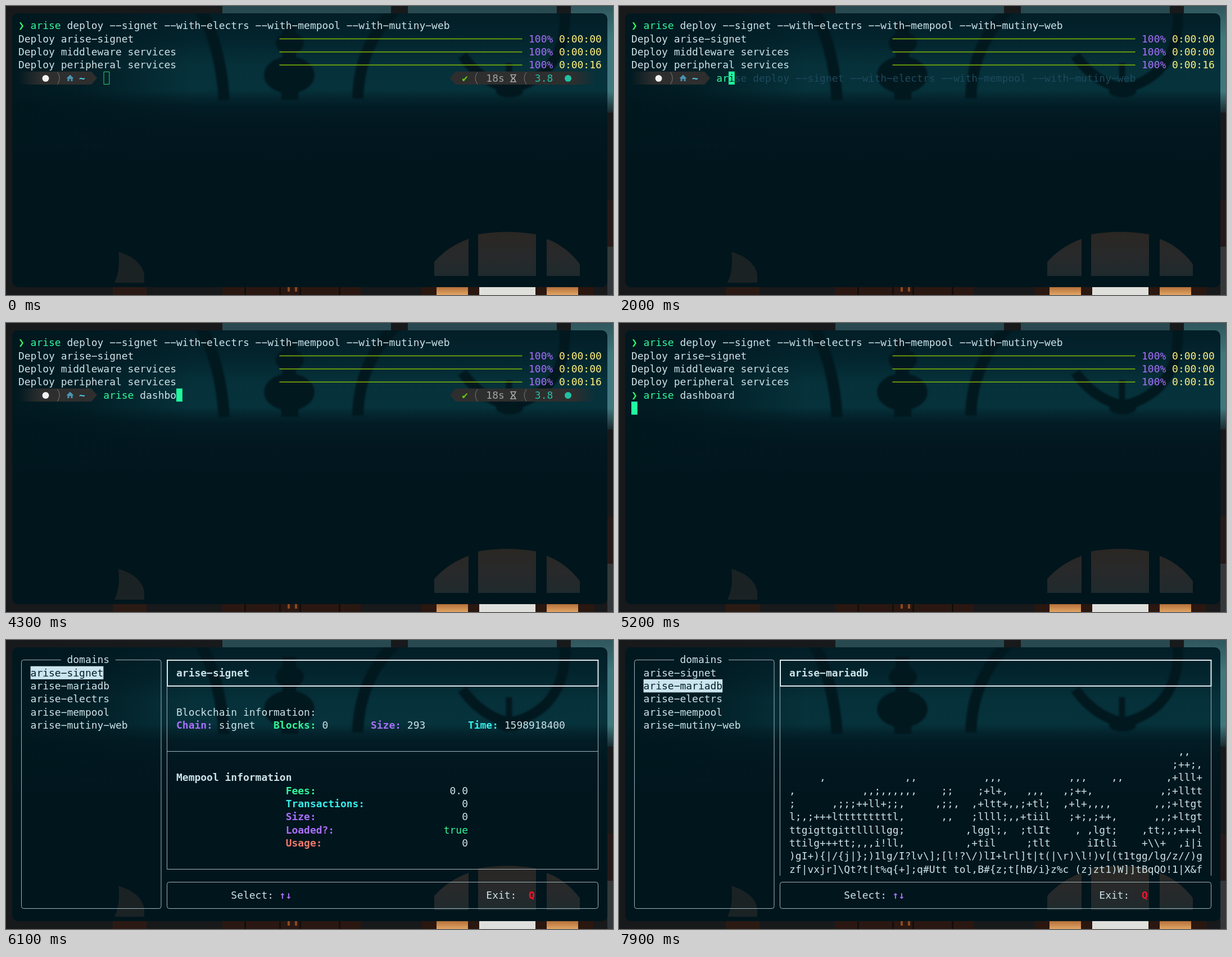
Animation of 1080 by 515 pixels, one loop 8 s. Source, as an HTML page with a canvas:

```html
<!DOCTYPE html>
<html lang="en">
<head>
<meta charset="utf-8">
<title>Terminal deploy and dashboard</title>
<style>
  html, body { margin: 0; width: 100%; height: 100%; overflow: hidden; background: #18191b; }
  canvas { display: block; }
</style>
</head>
<body>
<canvas id="stage" width="1080" height="515"></canvas>
<script>
const LOOP = 8000, FOCUS = 1000, ENTER = 5000, DASHBOARD = 5700, SELECT_DB = 6600;
const CELL = 10.81, LINE = 23.33, LEFT = 22, TOP = 23.4;
const TEXT = '#cbe3e9', GREEN = '#32f99a', PURPLE = '#a970ff', YELLOW = '#fff27c', CYAN = '#35f0ea',
  CORAL = '#f0786c', RED = '#f5122c', HINT = '#1d4a5d', FRAME = '#9db7be', INK = '#01202a';
const COMMAND = 'arise deploy --signet --with-electrs --with-mempool --with-mutiny-web';
const DOMAINS = ['signet', 'mariadb', 'electrs', 'mempool', 'mutiny-web'].map(n => 'arise-' + n);

const stage = document.getElementById('stage');
let ctx = stage.getContext('2d');

const colX = col => LEFT + col * CELL;
const rowY = row => TOP + row * LINE;

function put(text, col, row, color = TEXT, bold = false) {
  ctx.font = `${bold ? 'bold ' : ''}17.95px "DejaVu Sans Mono", monospace`;
  ctx.fillStyle = color;
  [...text].forEach((ch, i) => {
    if (ch !== ' ') ctx.fillText(ch === '-' ? '−' : ch, colX(col + i), rowY(row) + 17.9);
  });
}

function rect(x, y, w, h, color) {
  ctx.fillStyle = color;
  ctx.fillRect(x, y, w, h);
}

function dot(x, y, rx, color, ry = rx) {
  ctx.fillStyle = color;
  ctx.beginPath();
  ctx.ellipse(x, y, rx, ry, 0, 0, 7);
  ctx.fill();
}

function fillPath(d, color) {
  ctx.fillStyle = color;
  ctx.fill(new Path2D(d));
}

function strokePath(d, color, width = 1) {
  ctx.strokeStyle = color;
  ctx.lineWidth = width;
  ctx.stroke(new Path2D(d));
}

function gradient(x0, y0, x1, y1, ...stops) {
  const g = ctx.createLinearGradient(x0, y0, x1, y1);
  stops.forEach(([at, color]) => g.addColorStop(at, color));
  return g;
}

function box(x, y, w, h, radius, color, width) {
  ctx.strokeStyle = color;
  ctx.lineWidth = width;
  ctx.beginPath();
  ctx.roundRect(x, y, w, h, radius);
  ctx.stroke();
}

// Wallpaper and the translucent terminal window, painted once.
function paintBackdrop() {
  const layer = document.createElement('canvas');
  layer.width = 1080;
  layer.height = 515;
  const screen = ctx;
  ctx = layer.getContext('2d');

  rect(0, 0, 1080, 515, '#18191b');
  rect(385, 0, 300, 13, '#28494f');
  rect(715, 0, 265, 13, '#28494f');
  rect(1005, 0, 75, 190, gradient(0, 0, 0, 190, [0, '#2f565c'], [0.3, '#3f777d'], [0.8, '#3f777d'], [1, '#1a2a2e']));
  rect(1070, 345, 10, 85, '#251a19');
  rect(1070, 429, 10, 86, '#34383a');
  rect(190, 501, 60, 14, '#2b1a14');
  rect(385, 501, 246, 14, '#2a1711');
  [424, 486, 522, 592].forEach(x => rect(x, 501, 3, 14, '#120e0e'));
  [501, 514].forEach(x => rect(x, 501, 4, 8, '#8a4a22'));
  rect(740, 501, 305, 14, '#2a1710');
  const lamp = gradient(0, 501, 0, 515, [0, '#b4703a'], [1, '#e2a564']);
  rect(766, 501, 56, 14, lamp);
  rect(842, 501, 100, 14, '#dfe0dc');
  rect(962, 501, 56, 14, lamp);

  ctx.save();
  ctx.beginPath();
  ctx.roundRect(11, 13, 1059, 488, 10);
  ctx.clip();
  rect(11, 13, 1059, 488, gradient(0, 13, 0, 501,
    [0, '#031e27'], [0.1, '#03252e'], [0.19, '#06313a'], [0.28, '#06323b'], [0.31, '#04252e'],
    [0.34, '#021c25'], [0.42, '#02171f'], [0.55, '#01151d'], [1, '#01151c']));
  rect(11, 13, 320, 240, gradient(11, 0, 331, 0, [0, '#01171eee'], [0.4, '#01171ebb'], [1, '#01171e00']));

  // Soft silhouettes behind the glass.
  const shade = '#02181f';
  ctx.filter = 'blur(1.5px)';
  strokePath('M346 5 Q383 75 388 168', shade, 20);
  strokePath('M694 5 Q628 70 626 165', shade, 20);
  strokePath('M994 5 Q999 75 960 115 Q930 142 895 147 Q845 135 812 88', shade, 18);
  strokePath('M895 102 V150', shade, 11);
  dot(896, 152, 24, shade, 11);
  dot(505, 66, 25, shade, 19);
  rect(492, 30, 24, 70, shade);
  dot(504, 123, 45, shade, 33);
  rect(490, 140, 30, 27, shade);
  ctx.filter = 'none';

  const glow = gradient(0, 402, 0, 482, [0, '#2a2723'], [0.5, '#28292a'], [1, '#1f2a2d']);
  fillPath('M762 481 V456 Q787 428 823 415 V481Z M840 481 V407 Q892 398 943 407 V481Z'
    + 'M962 481 V415 Q997 428 1021 460 V481Z', glow);
  fillPath('M200 438 Q240 450 246 478 V493 H193 Q204 470 200 438Z', '#1a2224');
  ctx.restore();

  ctx = screen;
  return layer;
}

// Fire: each cell averages itself, its right neighbour and the two below.
const GLYPHS = ' ,;+ltgti!lI?/\\|)(1}{][rcvzjftJUOQocxfXhqwWB8&%$#@';
function burn(steps) {
  const width = 68, rows = 9, size = width * rows;
  const heat = new Array(size + width + 1).fill(0);
  let seed = 77;
  const random = () => (seed = (seed * 16807) % 2147483647) / 2147483647;
  const line = value => Array.from({ length: width }, (_, x) => GLYPHS[Math.floor(value(x))]).join('');
  return Array.from({ length: steps }, () => {
    for (let i = 0; i < 6; i++) heat[size - width + Math.floor(random() * width)] = 30;
    for (let i = 0; i < size; i++)
      heat[i] = Math.floor((heat[i] + heat[i + 1] + heat[i + width] + heat[i + width + 1]) / 4);
    const lines = [];
    for (let r = 0; r < rows - 1; r++) lines.push(line(x => heat[r * width + x]));
    lines.push(line(() => (random() + random()) * 14), line(() => random() * 50));
    return lines;
  });
}

// Typed text over time: a false start, one backspace, then the command.
function typedAt(t) {
  if (t < 1700) return '';
  if (t < 3480) return 'arise de'.slice(0, Math.floor((t - 1700) / 220) + 1);
  return 'arise d' + 'ashboard'.slice(0, Math.max(0, Math.floor((t - 3640) / 150) + 1));
}

function leftPrompt() {
  const y = rowY(4);
  fillPath(`M22 ${y} H152 L162 ${y + 11.7} L152 ${y + 23.3} H22Z`,
    gradient(22, 0, 62, 0, [0, '#2e2e2e00'], [1, '#2e2e2e']));
  dot(70.5, 129, 6, '#f2f2f2');
  strokePath('M91.5 118 Q99 128.5 91.5 139.5', '#77797a');
  fillPath('M107.5 129 L114 122.5 L120.5 129 H118.5 V134 H115.5 V130 H112.5 V134 H109.5 V129Z', '#4b95b3');
  put('~', 10, 4, '#55cdea', true);
}

function rightPrompt() {
  const y = rowY(4);
  fillPath(`M1050 ${y} H800 L790 ${y + 11.7} L800 ${y + 23.3} H1050Z`,
    gradient(1010, 0, 1050, 0, [0, '#2e2e2e'], [1, '#2e2e2e00']));
  put('✔', 73, 4, '#62cc0c');
  strokePath('M839 118 Q831 128.5 839 139.5 M926 118 Q918 128.5 926 139.5', '#77797a');
  put('18s', 77, 4, '#9ea3a3');
  strokePath('M897 122.5 H908 M897 135 H908 M899 123 Q899 127 902.5 129 Q906 127 906 123'
    + 'M899 135 Q899 131 902.5 129 Q906 131 906 135', '#a6aaaa', 1.6);
  put('3.8', 85, 4, '#22bfa2');
  dot(1000, 129, 6, '#22bfa2');
}

function drawShell(t) {
  put('❯', 0, 0, '#35f565', true);
  put('arise', 2, 0, GREEN);
  put(COMMAND.slice(5), 7, 0);
  [['arise-signet', '00'], ['middleware services', '00'], ['peripheral services', '16']].forEach(([name, sec], i) => {
    const row = i + 1;
    put('Deploy ' + name, 0, row);
    rect(486.5, rowY(row) + 11, 432, 1.6, '#78b206');
    put('100%', 84, row, PURPLE);
    put('0:00:' + sec, 89, row, YELLOW);
  });

  if (t >= ENTER) {
    put('❯', 0, 4, '#35f565', true);
    put('arise', 2, 4, GREEN);
    put('dashboard', 8, 4);
    rect(LEFT, rowY(5), CELL, LINE, '#1ffaa0');
    return;
  }

  const typed = typedAt(t), end = 14 + typed.length;
  const hint = typed && COMMAND.startsWith(typed) ? COMMAND.slice(typed.length) : '';
  leftPrompt();
  if (!hint) rightPrompt();
  put(typed.slice(0, 5), 14, 4, GREEN);
  put(typed.slice(5), 19, 4);
  if (hint && typed.length > 6) rect(colX(20), 135, (typed.length - 6) * CELL, 1.2, TEXT);
  put(hint, end, 4, HINT);
  if (t < FOCUS) {
    box(colX(end) + 0.7, rowY(4) + 0.6, CELL - 1, LINE - 1.2, 0, '#2bd96a', 1);
  } else {
    rect(colX(end), rowY(4), CELL, LINE, '#1ffaa0');
    put(hint.slice(0, 1), end, 4, INK);
  }
}

function drawInfo() {
  strokePath('M286.5 82 V408.5 H1053.5 V82 M286.5 198.5 H1053.5', FRAME);
  put('Blockchain information:', 26, 4);
  [['Chain:', 26, PURPLE, 'signet'], ['Blocks:', 42, GREEN, '0'],
   ['Size:', 58, PURPLE, '293'], ['Time:', 74, CYAN, '1598918400']].forEach(([label, col, color, value]) => {
    put(label, col, 5, color, true);
    put(value, col + label.length + 1, 5);
  });
  put('Mempool information', 26, 9, TEXT, true);
  [['Fees:', GREEN, '0.0'], ['Transactions:', CYAN, '0'], ['Size:', PURPLE, '0'],
   ['Loaded?:', PURPLE, 'true'], ['Usage:', CORAL, '0']].forEach(([label, color, value], i) => {
    put(label, 44, 10 + i, color, true);
    put(value, 74 - value.length, 10 + i, value === 'true' ? GREEN : TEXT);
  });
}

function drawDashboard(t) {
  const selected = t < SELECT_DB ? 0 : 1;
  strokePath('M98 35.5 H31.5 Q27.5 35.5 27.5 39.5 V474.5 Q27.5 478.5 31.5 478.5'
    + 'H272 Q276 478.5 276 474.5 V39.5 Q276 35.5 272 35.5 H195', FRAME);
  put('domains', 8, 0);
  DOMAINS.forEach((name, i) => {
    if (i === selected) rect(colX(2), rowY(i + 1), name.length * CELL, LINE, '#cbe4ee');
    put(name, 2, i + 1, i === selected ? INK : TEXT);
  });

  if (selected) {
    strokePath('M286.5 82 V420 M1053.5 82 V420', FRAME);
    const step = Math.min(fire.length - 1, Math.floor((t - SELECT_DB) / 100));
    fire[step].forEach((line, i) => put(line, 26, 7 + i));
  } else {
    drawInfo();
  }
  box(287, 36, 766.5, 46, 0, '#dcebef', 2);
  put(DOMAINS[selected], 26, 1, TEXT, true);

  box(286.5, 431.5, 767, 47, 4, FRAME, 1);
  put('Select:', 35, 18);
  put('↑↓', 43, 18, PURPLE, true);
  put('Exit:', 77, 18);
  put('Q', 84, 18, RED, true);
}

const backdrop = paintBackdrop();
const fire = burn(14);

function draw(now) {
  const t = now % LOOP;
  ctx.drawImage(backdrop, 0, 0);
  (t < DASHBOARD ? drawShell : drawDashboard)(t);
  requestAnimationFrame(draw);
}
requestAnimationFrame(draw);
</script>
</body>
</html>
```
